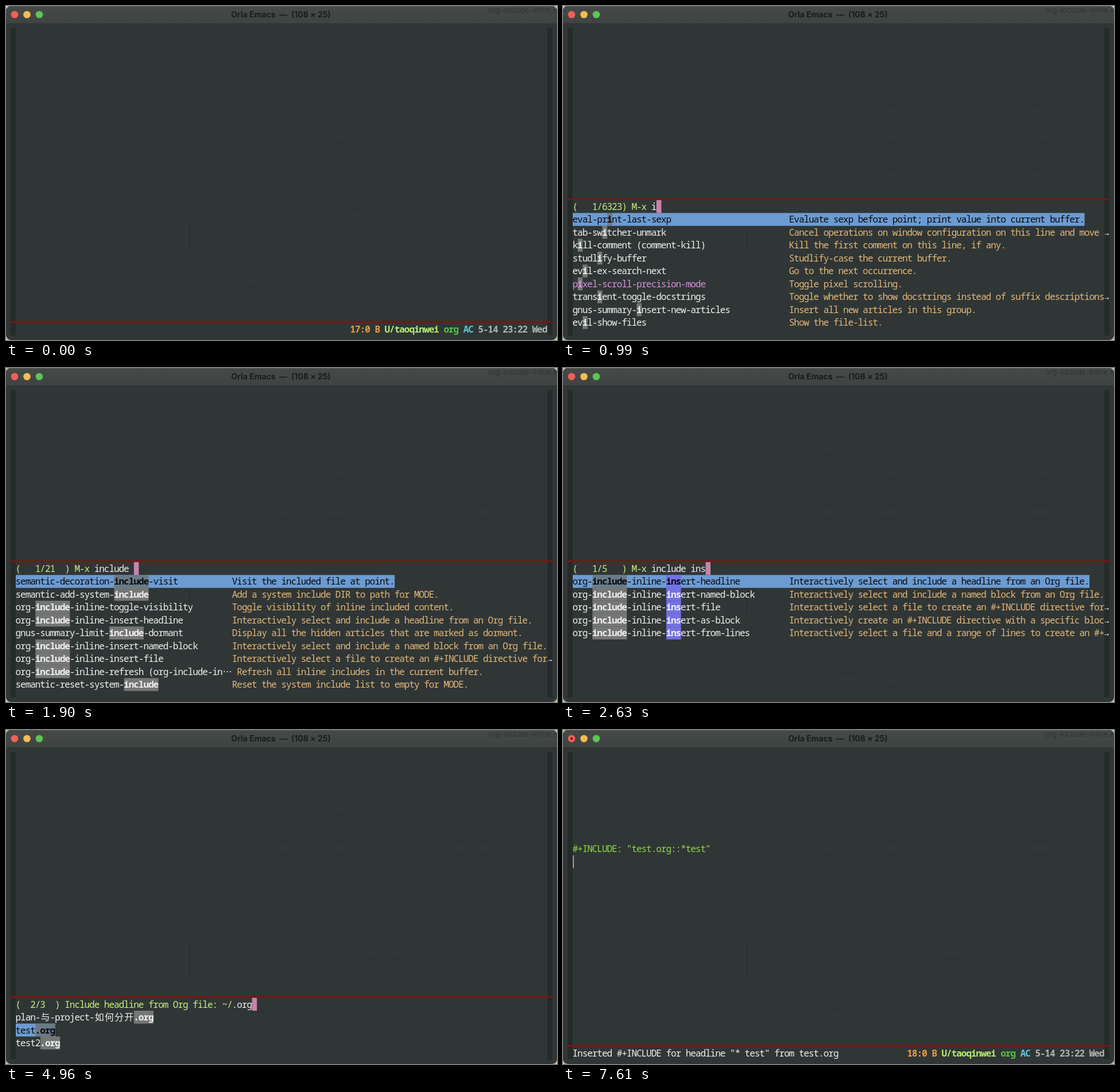
These frames come from a looping animation (960x583 px, 8000 ms). An HTML page with a canvas:

```html
<!DOCTYPE html>
<html lang="en">
<head>
<meta charset="utf-8">
<title>Include a headline</title>
<style>
  html, body { margin: 0; width: 100%; height: 100%; overflow: hidden; background: #c9c6ae; }
  canvas { display: block; }
</style>
</head>
<body>
<canvas id="stage" width="960" height="583"></canvas>
<script>
const ctx = document.getElementById('stage').getContext('2d');
const LOOP = 8000, LEFT = 17, CELL = 926 / 108, ROW = 22.5, COLUMNS = 108;
const MONO = '16px "Noto Sans Mono", "Noto Sans CJK SC", monospace';
const INK = { white: '#f0f0ee', black: '#080a0c', prompt: '#c4f27d', note: '#e3b878', mode: '#d98fd9',
  select: '#6c9bd2', match: '#757676', second: '#7470e4', cursor: '#c883aa', line: '#7b1512' };

// name | description, in completion order; a leading * marks an active mode
const COMMANDS = `save-buffer|Save current buffer in visited file if modified.
next-error|Visit next error message and corresponding source code.
org-cycle|Visibility cycling for Org mode.
eval-print-last-sexp|Evaluate sexp before point; print value into current buffer.
tab-switcher-unmark|Cancel operations on window configuration on this line and move down.
kill-comment (comment-kill)|Kill the first comment on this line, if any.
studlify-buffer|Studlify-case the current buffer.
evil-ex-search-next|Go to the next occurrence.
*pixel-scroll-precision-mode|Toggle pixel scrolling.
transient-toggle-docstrings|Toggle whether to show docstrings instead of suffix descriptions in menus.
gnus-summary-insert-new-articles|Insert all new articles in this group.
evil-show-files|Show the file-list.
semantic-decoration-include-visit|Visit the included file at point.
semantic-add-system-include|Add a system include DIR to path for MODE.
org-include-inline-toggle-visibility|Toggle visibility of inline included content.
org-include-inline-insert-headline|Interactively select and include a headline from an Org file.
gnus-summary-limit-include-dormant|Display all the hidden articles that are marked as dormant.
org-include-inline-insert-named-block|Interactively select and include a named block from an Org file.
org-include-inline-insert-file|Interactively select a file to create an #+INCLUDE directive for the whole file.
org-include-inline-refresh (org-include-in⋯|Refresh all inline includes in the current buffer.
magit-log-including|Show a log including merges.
semantic-reset-system-include|Reset the system include list to empty for MODE.
org-include-inline-insert-as-block|Interactively create an #+INCLUDE directive with a specific block type.
org-include-inline-insert-from-lines|Interactively select a file and a range of lines to create an #+INCLUDE directive.`
  .split('\n').map(entry => {
    const [name, note] = entry.split('|');
    return { name: name.replace('*', ''), note, active: name[0] === '*' };
  });

// time, minibuffer input, number of matches
const TYPING = [[430, '', 8761], [930, 'i', 8761], [990, 'i', 6323], [1110, 'in', 3380], [1170, 'inc', 58],
  [1230, 'incl', 22], [1540, 'inclu', 22], [1660, 'includ', 22], [1840, 'include', 21], [1900, 'include ', 21],
  [2270, 'include i', 21], [2450, 'include in', 21], [2630, 'include ins', 5], [3060, 'include inse', 5],
  [3240, 'include inser', 5], [3420, 'include insert', 5]];

const between = (t, from, to) => t >= from && t < to;
const xOf = col => LEFT + col * CELL;
const cells = ch => ch === '⋯' || ch >= '\u2e80' ? 2 : 1;
const widthOf = text => [...text].reduce((sum, ch) => sum + cells(ch), 0);

function rect(x, y, w, h, color) {
  ctx.fillStyle = color;
  ctx.fillRect(x, y, w, h);
}

function disc(x, y, r, color) {
  ctx.fillStyle = color;
  ctx.beginPath();
  ctx.arc(x, y, r, 0, 7);
  ctx.fill();
}

// Writes text on the character grid and returns the next free column.
function put(text, col, top, color, bold = false) {
  ctx.font = `${bold ? 'bold' : '500'} condensed ${MONO}`;
  ctx.textAlign = 'center';
  ctx.fillStyle = color;
  for (const ch of text) {
    ctx.fillText(ch, xOf(col + cells(ch) / 2), top + 17);
    col += cells(ch);
  }
  return col;
}

function fillCells(col, count, top, color) {
  rect(xOf(col), top, count * CELL, ROW, color);
}

function redLine(y) {
  rect(8, y, 944, 3, INK.line);
}

function candidate({ name, note = '', active }, terms, top, selected) {
  const noteCol = Math.max(44, widthOf(name) + 1);
  const shown = note.slice(0, COLUMNS - noteCol);
  const ink = selected ? INK.black : active ? INK.mode : INK.white;
  if (selected) fillCells(0, note ? noteCol + shown.length : widthOf(name), top, INK.select);
  put(name, 0, top, ink);
  put(shown, noteCol, top, selected ? INK.black : INK.note);
  if (shown.length < note.length) put('→', COLUMNS, top, INK.white);
  terms.forEach((term, i) => {
    const at = name.indexOf(term);
    if (!term || at < 0) return;
    const col = widthOf(name.slice(0, at));
    fillCells(col, term.length, top, i ? INK.second : selected ? '#6a7a86' : INK.match);
    put(term, col, top, ink, true);
  });
}

function minibuffer(top, prompt, input, items, terms, selected, cursorOn = true) {
  redLine(top - 3);
  const end = put(input, put(prompt, 0, top, INK.prompt), top, INK.white);
  if (cursorOn) fillCells(end, 1, top, INK.cursor);
  items.forEach((item, i) => candidate(item, terms, top + ROW * (i + 1), i === selected));
}

function commandPrompt(t) {
  const [, input, total] = TYPING.findLast(step => t >= step[0]);
  const terms = (t < 990 ? '' : input).split(' ');
  const found = COMMANDS.filter(c => terms.every(term => c.name.includes(term))).slice(0, 9);
  const prompt = `(   ${('1/' + total).padEnd(6)}) M-x `;
  const leaving = t >= 3790;
  minibuffer(338.8, prompt, input, found, terms, 0, !leaving);
  if (leaving) {
    fillCells(0, 1, 338.8, INK.cursor);
    put('(', 0, 338.8, '#303636');
  }
}

function filePrompt(t) {
  const chosen = t < 4960 ? 0 : 1;
  const files = ['plan-与-project-如何分开.org', 'test.org', 'test2.org'].map(name => ({ name }));
  minibuffer(467.5, `(  ${chosen + 1}/3  ) Include headline from Org file: ~/`, '.org',
    files, ['.org'], chosen, !between(t, 4340, 4900));
}

function headlinePrompt(t) {
  const chosen = between(t, 6070, 6320) ? 1 : 0;
  minibuffer(487.5, `(${chosen + 1}/2) Select headline: `, '',
    [{ name: '* test' }, { name: '* test2' }], [], chosen, !between(t, 5820, 6070));
}

function editor(t) {
  const inserted = t >= 6690;
  redLine(549.7);
  let col = 68;
  for (const [text, color] of [[inserted ? '18:0 B ' : '17:0 B ', '#ee9a3e'], ['U/taoqinwei ', '#b6ee6c'],
    ['org ', '#55c33f'], ['AC ', '#5cc8da'], ['5-14 23:22 Wed', '#b0b4b2']]) {
    col = put(text, col, 553, color, true);
  }
  if (inserted) put('#+INCLUDE: "test.org::*test"', 0, 196.3, '#8fd944');
  if (t >= 6750) put('Inserted #+INCLUDE for headline "* test" from test.org', 0, 553, INK.white);
  if (t >= 120 && !between(t, 7180, 7610)) rect(LEFT, inserted ? 218.8 : 196.3, 2, ROW, INK.cursor);
}

// Barely visible writing that shines through the translucent window.
function backdrop() {
  ctx.textAlign = 'left';
  ctx.font = '12px Inter, sans-serif';
  ctx.fillStyle = 'rgba(0, 0, 0, .06)';
  for (const y of [76, 98, 125, 250, 276, 403, 427, 451, 475, 498, 521, 545]) ctx.fillText('include-inline', 24, y);
  for (let y = 153; y < 300; y += 22.5) {
    ctx.fillText('org-include-inline-insert-headline', 405, y);
    ctx.fillText('include a headline from file', 757, y);
  }
  for (const [x, y] of [[460, 336], [540, 359], [604, 402], [445, 449], [430, 470], [398, 493], [420, 537], [490, 560]]) {
    ctx.fillText('include a headline', x, y);
  }
  rect(319, 258, 2, 34, 'rgba(0, 0, 0, .05)');
  rect(319, 369, 2, 62, 'rgba(0, 0, 0, .1)');
}

function windowFrame(modified) {
  ctx.clearRect(0, 0, 960, 583);
  rect(0, 0, 960, 583, '#303636');
  backdrop();
  const bar = ctx.createLinearGradient(0, 0, 0, 30);
  bar.addColorStop(0, '#454a48');
  bar.addColorStop(1, '#3f4443');
  rect(0, 0, 960, 30, bar);
  rect(0, 0, 960, 1, '#5b605e');
  for (const x of [8, 943]) rect(x, 39, 9, 536, '#252a2a');
  ['#f35f56', '#f4bd4f', '#5cc553'].forEach((color, i) => disc(15 + 21.5 * i, 15, 6.3, color));
  if (modified) disc(15, 15, 2.2, '#7d1610');
  ctx.font = '13px Inter, sans-serif';
  ctx.textAlign = 'left';
  ctx.fillStyle = '#303433';
  ctx.fillText('org-include-inline.el', 840, 12);
  ctx.font = 'bold 14px Inter, sans-serif';
  ctx.textAlign = 'center';
  ctx.fillStyle = '#191c1c';
  ctx.fillText('Orla Emacs  —  (108 × 25)', 479, 19.5);
}

function draw(now) {
  const t = now % LOOP;
  ctx.save();
  ctx.beginPath();
  ctx.roundRect(0, 0, 960, 583, 9);
  ctx.clip();
  windowFrame(t >= 6690);
  if (between(t, 430, 3910)) commandPrompt(t);
  else if (between(t, 3910, 5330)) filePrompt(t);
  else if (between(t, 5390, 6630)) headlinePrompt(t);
  else editor(t);
  ctx.restore();
}

const start = performance.now();
function tick() {
  draw(performance.now() - start);
  requestAnimationFrame(tick);
}
tick();
</script>
</body>
</html>
```
